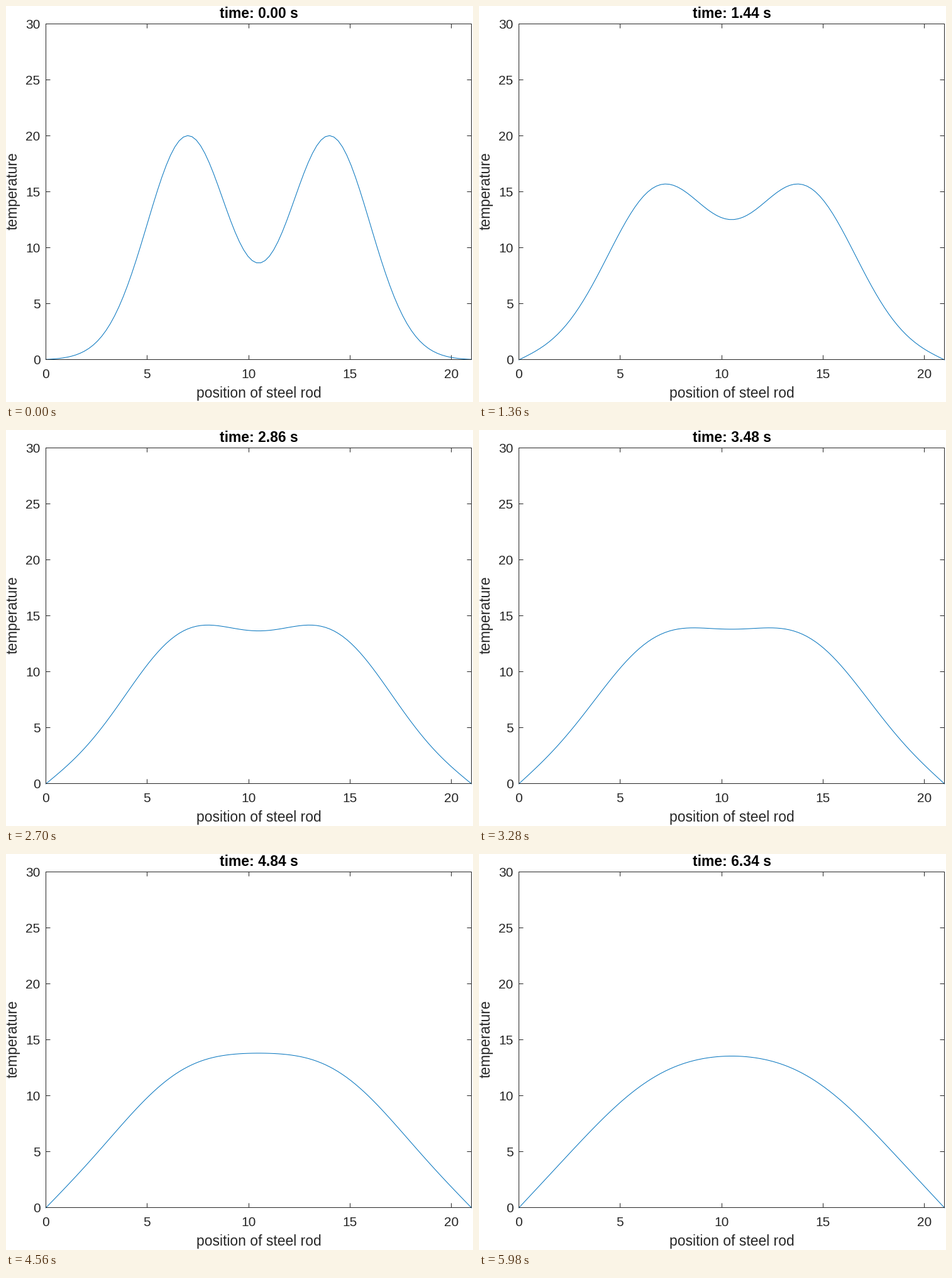
Write a matplotlib script that moves like this. It is 743 px wide and 630 px high and loops after 6000 ms.

```python
import numpy as np
import matplotlib.pyplot as plt
from matplotlib.animation import FuncAnimation
from matplotlib.transforms import ScaledTranslation

W, H, DPI = 743, 630, 100
PX = 72 / DPI                      # points per pixel
# Lines snap to the centre of the pixel that starts at these edges.
LEFT, RIGHT, TOP, BOTTOM = 63, 740.4, 28, 562
DARK, BLUE = "#262626", "#0072BD"
TICK_SIZE, LABEL_SIZE = 20.83, 22.92
FRAMES, INTERVAL = 300, 20

LENGTH, NODES = 21, 100
x = np.linspace(0, LENGTH, NODES)
dx = x[1] - x[0]
dt = dx / 10


def solve():
    """Heat equation on a rod with cold ends, explicit steps."""
    u = sum(20 * np.exp(-(x - c) ** 2 / 8) for c in (7, 14))
    states = [u]
    for _ in range(FRAMES - 1):
        new = np.zeros_like(u)
        new[1:-1] = u[1:-1] + dt / dx**2 * (u[2:] - 2 * u[1:-1] + u[:-2])
        states.append(new)
        u = new
    return states


plt.rcParams["font.family"] = "Liberation Sans"
fig = plt.figure(figsize=(W / 100, H / 100), dpi=DPI, facecolor="white")
ax = fig.add_axes([LEFT / W, 1 - BOTTOM / H,
                   (RIGHT - LEFT) / W, (BOTTOM - TOP) / H])
ax.set(xlim=(0, LENGTH), ylim=(0, 30),
       xticks=range(0, 21, 5), yticks=range(0, 31, 5))
ax.tick_params(direction="in", top=True, right=True, length=6.8 * PX,
               width=PX, color=DARK, labelbottom=False, labelleft=False)
for spine in ax.spines.values():
    spine.set(linewidth=PX, edgecolor=DARK)


def label(px, py, text, size=LABEL_SIZE, color=DARK, ha="center", **kw):
    """Text with its baseline at a pixel position counted from the top left."""
    return fig.text(px / W, 1 - py / H, text, fontsize=size * PX, color=color,
                    ha=ha, va="baseline", rotation_mode="anchor", **kw)


for v in range(0, 21, 5):
    label(LEFT + (RIGHT - LEFT) * v / LENGTH, 592, str(v), TICK_SIZE)
for v in range(0, 31, 5):
    label(54.5, BOTTOM - (BOTTOM - TOP) * v / 30 + 8, str(v), TICK_SIZE,
          ha="right")
label(402, 623, "position of steel rod")
label(18, 294, "temperature", rotation=90)
title = label(402.5, 19.4, "", color="black", weight="bold")

# The curve is not snapped, so it gets its own sub-pixel offset.
states = solve()
nudge = ScaledTranslation(0.3 / DPI, -1 / DPI, fig.dpi_scale_trans)
curve, = ax.plot(x, states[0], color=BLUE, lw=PX, clip_on=False,
                 transform=ax.transData + nudge)


def update(i):
    curve.set_ydata(states[i])
    title.set_text(f"time: {i * dt:.2f} s")
    return curve, title


anim = FuncAnimation(fig, update, frames=FRAMES, interval=INTERVAL,
                     repeat=True, repeat_delay=0, blit=False)
plt.show()
```
